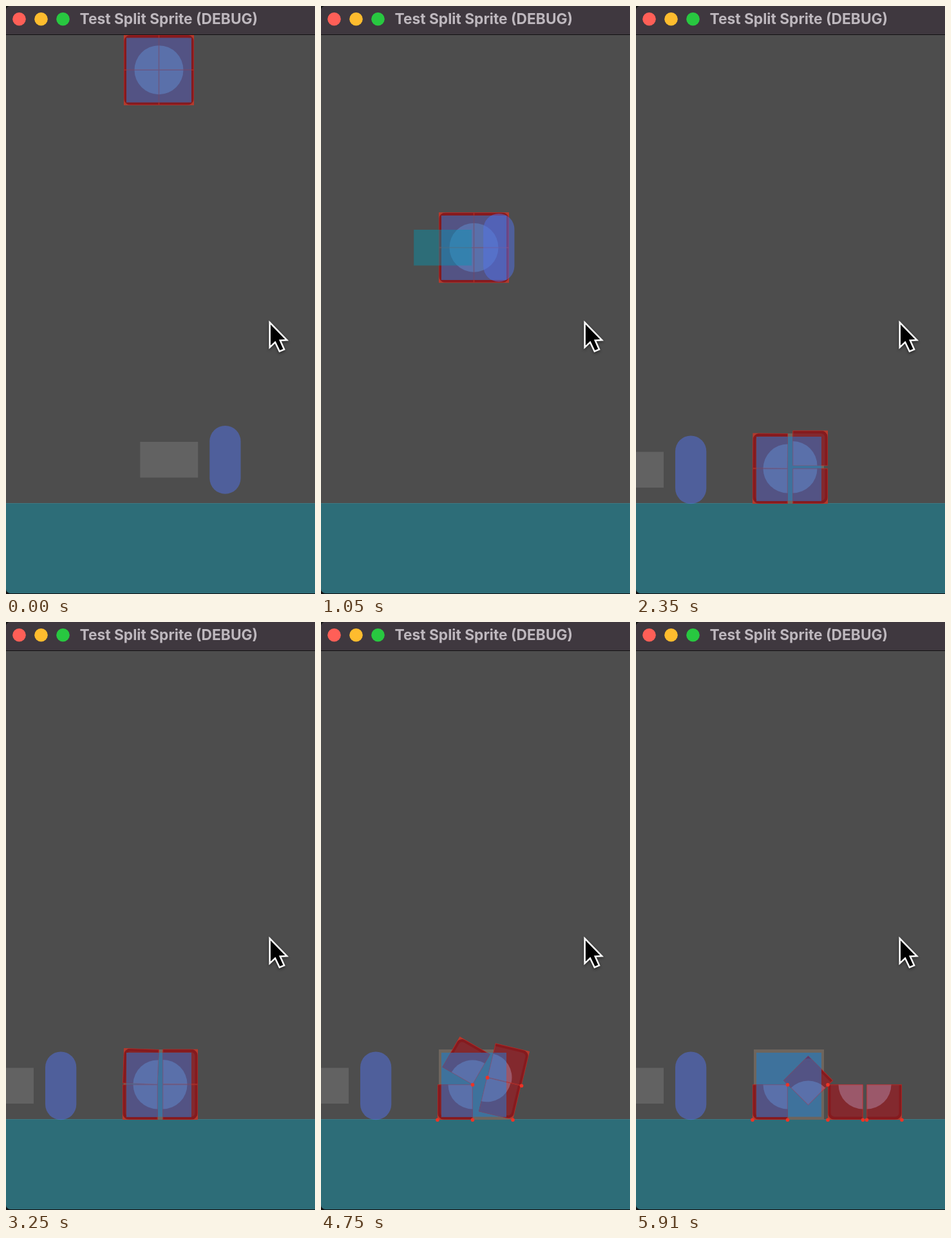
Animation, 480 px wide and 912 px high, one loop 5.98 s. Source, as an HTML page with a canvas:

```html
<!DOCTYPE html>
<html lang="en">
<head>
<meta charset="utf-8">
<title>Split sprite</title>
<style>
html, body { margin: 0; width: 100%; height: 100%; overflow: hidden; background: #111; }
canvas { display: block; width: 100vw; height: 100vh; }
</style>
</head>
<body>
<canvas id="stage" width="480" height="912"></canvas>
<script>
const ctx = document.getElementById('stage').getContext('2d');
const LOOP = 5980, STEP = 50;
const FLOOR = 772, ICON_X = 237.5, ICON_TOP = 44.7, ICON_REST = 663;
const HALF = 27.25, SIDE = 2 * HALF;
const TEAL = 'rgba(0,153,179,.42)';

const BARE = { corner: '#b03c2d', rim: '#851a1e', fill: '#83292e', disc: '#9b586a', line: 'rgba(205,50,40,.65)' };
const TINTED = { corner: '#5a3a70', rim: '#535384', fill: '#535384', disc: '#5a70aa', line: 'rgba(150,70,80,.5)' };

const clamp = (v, a = 0, b = 1) => Math.min(b, Math.max(a, v));
const ramp = (t, from, to) => clamp((t - from) / (to - from));

function rect(x, y, w, h, color) {
  ctx.fillStyle = color;
  ctx.fillRect(x, y, w, h);
}

function round(x, y, w, h, r, color) {
  ctx.fillStyle = color;
  ctx.beginPath();
  ctx.roundRect(x, y, w, h, r);
  ctx.fill();
}

function disc(x, y, r, color) {
  ctx.fillStyle = color;
  ctx.beginPath();
  ctx.arc(x, y, r, 0, 7);
  ctx.fill();
}

// Point at offset (dx, dy) from (x, y), turned by deg
function turn(x, y, dx, dy, deg) {
  const a = deg * Math.PI / 180, c = Math.cos(a), s = Math.sin(a);
  return { x: x + dx * c - dy * s, y: y + dx * s + dy * c, deg };
}

// An unstable block tips exponentially until it lies flat
const tip = (t, deg, rate, max) => Math.min(max, deg * Math.exp(rate * (t - 4.75)));

const iconTop = t => Math.min(ICON_REST, ICON_TOP + 805 * Math.max(0, t - .465) ** 2);

function hero(t) {
  const rest = 666.5, apex = 1.047;
  let y = 651 + 450 * t * t;
  if (t >= .5) y = 322 + (t < apex ? 1153 : 450) * (t - apex) ** 2;
  return { x: 316.3 - 255.3 * ramp(t, .95, 1.348), y: Math.min(rest, y) };
}

function pieces(t) {
  const settle = ramp(t, 1.5, 2.2);
  const mid = ICON_X + 2 * settle, gap = 4 * settle;
  const left = mid - gap, right = mid + gap + SIDE;
  const shelf = FLOOR - SIDE;
  const tilt = tip(t, 30, 1.73, 45), lean = tip(t, 13.4, 4, 90);
  const slide = 32 * ramp(t, 4.75, 5.25) ** 1.5;
  const lift = 4.5 * settle * (1 - ramp(t, 2.9, 3.3));

  const bl = { x: left - HALF, y: FLOOR - HALF, deg: 0 };
  const tl = turn(left + slide, shelf + slide, -HALF, -HALF, tilt);
  const br = turn(right, FLOOR, -HALF, -HALF, lean);
  const tr = turn(right + lean / 15, FLOOR - lift, -HALF, -3 * HALF, lean);
  return [
    { ...bl, sx: -1, sy: 1 },
    { ...tl, sx: -1, sy: -1 },
    { ...br, sx: 1, sy: 1 },
    { ...tr, sx: 1, sy: -1 }
  ];
}

const cornerOf = (p, sx, sy) => turn(p.x, p.y, sx * HALF, sy * HALF, p.deg);

function drawPiece(p, dy, look) {
  ctx.save();
  ctx.translate(p.x, p.y + dy);
  ctx.rotate(p.deg * Math.PI / 180);
  ctx.beginPath();
  ctx.rect(-HALF, -HALF, SIDE, SIDE);
  ctx.clip();
  ctx.save();
  ctx.translate(-p.sx * HALF, -p.sy * HALF);
  rect(-SIDE, -SIDE, 2 * SIDE, 2 * SIDE, look.corner);
  round(-SIDE, -SIDE, 2 * SIDE, 2 * SIDE, 11, look.rim);
  round(4.5 - SIDE, 4.5 - SIDE, 2 * SIDE - 9, 2 * SIDE - 9, 6, look.fill);
  disc(0, 0, 38, look.disc);
  ctx.restore();
  ctx.strokeStyle = look.line;
  ctx.lineWidth = 1.6;
  ctx.strokeRect(-HALF, -HALF, SIDE, SIDE);
  ctx.restore();
}

function drawIcon(t, list) {
  const top = iconTop(t), dy = top - ICON_REST;
  rect(183, top, 109, 109, '#6e655d');
  list.forEach(p => drawPiece(p, dy, BARE));
  ctx.save();
  ctx.beginPath();
  ctx.rect(187, top + 5, 101, 99.5);
  ctx.clip();
  rect(187, top, 101, 109, '#3e729c');
  list.forEach(p => drawPiece(p, dy, TINTED));
  ctx.restore();
}

function drawContacts(t, list) {
  const falling = t < 1.35, asleep = t >= 2.2 && t < 3.5;
  if (falling || asleep) return;
  const dots = [];
  for (const p of list) {
    for (const sx of [-1, 1]) for (const sy of [-1, 1]) {
      const c = cornerOf(p, sx, sy);
      const outer = sx === p.sx;
      if (FLOOR - c.y < .4 && (outer || t > 3.5)) dots.push(c);
    }
  }
  if (t >= 3.5) {
    const [bl, , br, tr] = list;
    dots.push(cornerOf(bl, 1, -1));
    if (tr.deg < 90) dots.push(cornerOf(tr, -1, 1), cornerOf(tr, 1, 1));
    else dots.push(cornerOf(br, -1, 1));
  }
  dots.forEach(d => disc(d.x, d.y + .3, 2.8, '#ec3426'));
}

function drawHero(t) {
  const { x, y } = hero(t);
  const active = t >= .95 && t < 1.25;
  rect(x - 108, y + 25, 90, 55.5, active ? TEAL : 'rgba(182,182,182,.2)');
  round(x, y, 48.3, 105.7, 24.15, 'rgba(83,115,233,.5)');
}

function drawCursor() {
  const pts = [[411, 494], [411, 526.5], [418.5, 519.5], [425.5, 534], [430.5, 532], [424, 517.5], [433.5, 517]];
  ctx.save();
  ctx.beginPath();
  pts.forEach(p => ctx.lineTo(...p));
  ctx.closePath();
  ctx.shadowColor = 'rgba(0,0,0,.45)';
  ctx.shadowBlur = 4;
  ctx.shadowOffsetY = 2;
  ctx.strokeStyle = '#fff';
  ctx.lineWidth = 5;
  ctx.stroke();
  ctx.shadowColor = 'transparent';
  ctx.fillStyle = '#000';
  ctx.fill();
  ctx.restore();
}

function drawTitleBar() {
  rect(0, 0, 480, 44, '#3f383f');
  rect(0, 44, 480, 1, '#121012');
  ['#ff5f57', '#febc2e', '#28c840'].forEach((c, i) => disc(20.5 + 34 * i, 20.3, 10.3, c));
  ctx.fillStyle = '#beb8be';
  ctx.font = '700 22.75px Inter, sans-serif';
  ctx.fillText('Test Split Sprite (DEBUG)', 114.5, 27.7);
}

function draw(t) {
  const list = pieces(t);
  rect(0, 0, 480, 912, '#111');
  ctx.save();
  ctx.beginPath();
  ctx.roundRect(0, 0, 480, 911, [7, 0, 0, 7]);
  ctx.clip();
  rect(0, 0, 480, 912, '#4d4d4d');
  rect(0, FLOOR - 1, 480, 141, TEAL);
  rect(0, FLOOR - 1, 480, 1, 'rgba(255,255,255,.08)');
  drawIcon(t, list);
  drawHero(t);
  drawContacts(t, list);
  drawTitleBar();
  ctx.restore();
  drawCursor();
}

const start = performance.now();
function tick() {
  const ms = (performance.now() - start) % LOOP;
  draw(Math.floor(ms / STEP) * STEP / 1000);
  requestAnimationFrame(tick);
}
tick();
</script>
</body>
</html>
```
